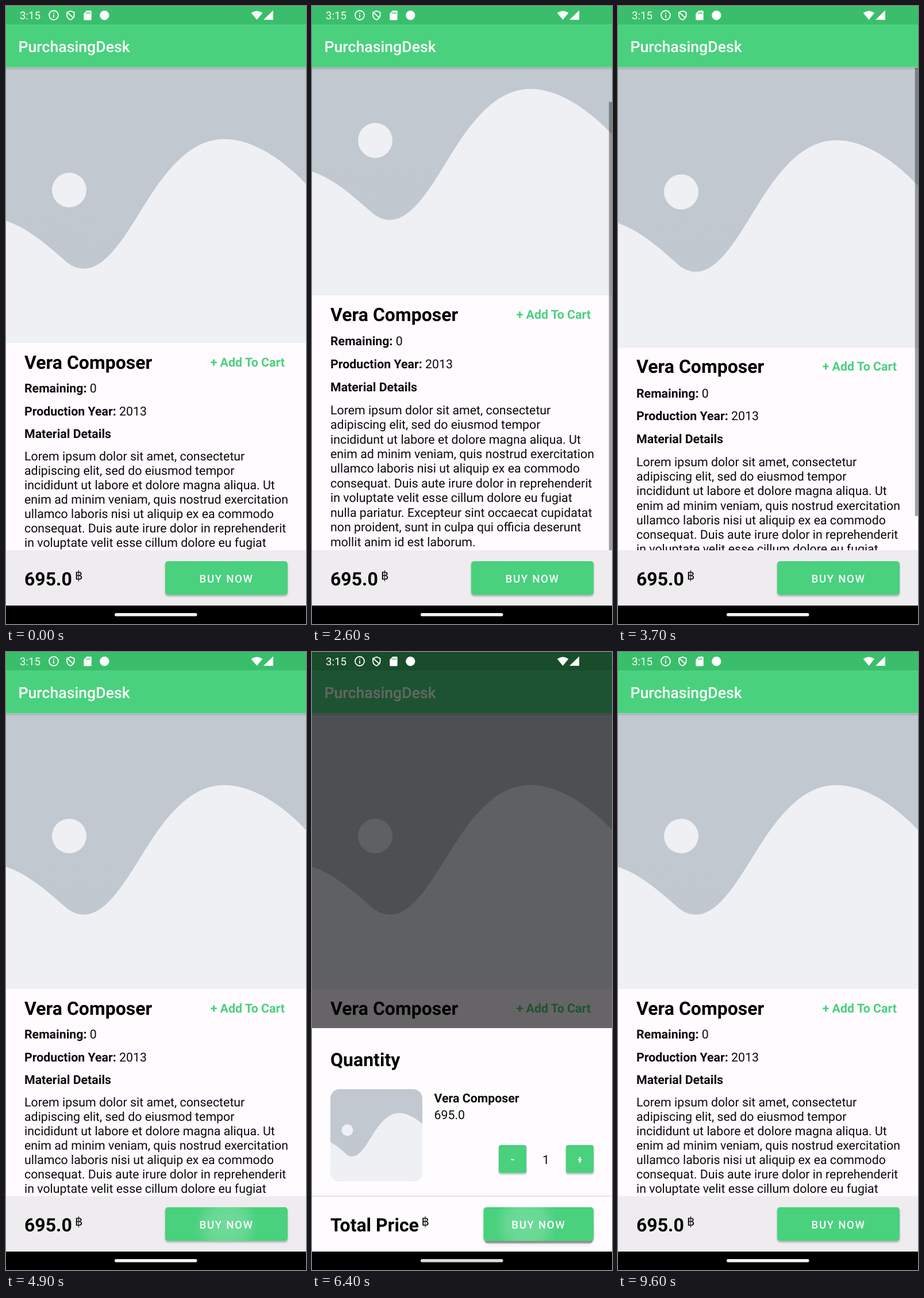
Recreate the animation shown at these times as an HTML page. Size 522 by 1073 pixels, loop 9.9 s.

```html
<!DOCTYPE html>
<html lang="en">
<head>
<meta charset="utf-8">
<title>Product page</title>
<style>
  html, body { margin: 0; width: 100%; height: 100%; overflow: hidden; background: #000; }
  svg { display: block; width: 100%; height: 100%; }
  text { font-family: Roboto, "Noto Sans", "DejaVu Sans", sans-serif; font-size: 21.33px; fill: #0a0a0b; white-space: pre; text-rendering: geometricPrecision; }
  .bold { font-weight: 700; }
  .big { font-size: 32px; font-weight: 700; fill: #000; }
  .baht { font-size: 21.33px; }
  .bar { font-size: 26.67px; font-weight: 500; fill: #fff; }
  .small { font-size: 18.67px; }
  .cta { font-size: 18.67px; font-weight: 500; letter-spacing: 1.67px; fill: #fff; }
  .green { fill: #4ad17e; }
  .white { fill: #fff; }
  .line { fill: none; stroke: #fff; stroke-width: 1.8; }
</style>
</head>
<body>
<svg viewBox="0 0 522 1073" preserveAspectRatio="none">
  <defs>
    <linearGradient id="sky" x1="0" y1="0" x2="0" y2="1">
      <stop offset="0" stop-color="#c2c8d0"/><stop offset="1" stop-color="#c0c8cf"/>
    </linearGradient>
    <linearGradient id="under" x1="0" y1="0" x2="0" y2="1">
      <stop offset="0" stop-opacity=".16"/><stop offset="1" stop-opacity="0"/>
    </linearGradient>
    <radialGradient id="wash">
      <stop offset="0" stop-color="#fff" stop-opacity=".22"/>
      <stop offset=".6" stop-color="#fff" stop-opacity=".16"/>
      <stop offset="1" stop-color="#fff" stop-opacity="0"/>
    </radialGradient>
    <filter id="lift" x="-20%" y="-20%" width="140%" height="160%">
      <feDropShadow dx="0" dy="2.2" stdDeviation="1.7" flood-opacity=".3"/>
    </filter>
    <filter id="float" x="-10%" y="-30%" width="120%" height="170%">
      <feDropShadow dx="0" dy="2.5" stdDeviation="3" flood-opacity=".3"/>
    </filter>
    <clipPath id="view"><rect y="106.5" width="522" height="838.5"/></clipPath>
    <clipPath id="thumb"><rect x="32" y="759" width="160" height="160" rx="16"/></clipPath>
    <clipPath id="mainClip"><rect x="277" y="964" width="213" height="58.5" rx="5"/></clipPath>
    <clipPath id="sheetClip"><rect x="298.5" y="964" width="191.5" height="58.5" rx="5"/></clipPath>
    <clipPath id="plusClip"><rect x="463" y="870" width="6.4" height="24"/></clipPath>
    <g id="picture">
      <rect y="107" width="522" height="478" fill="url(#sky)"/>
      <path fill="#eef0f4" d="M0 373C40 386 76 419 106 445C125 460 147 460 168 443C203 416 231 356 265 309C299 262 335 231 380 231C430 231 482 267 522 309V585H0Z"/>
      <circle cx="110" cy="319.5" r="30" fill="#eef0f4"/>
    </g>
  </defs>

  <rect width="522" height="1073" fill="#fffbff"/>
  <g id="content" clip-path="url(#view)">
    <use id="photo" href="#picture"/>
    <text class="big" x="32" y="629.5">Vera Composer</text>
    <text class="bold green" x="485" y="625.5" text-anchor="end">+ Add To Cart</text>
    <text x="32" y="671.3"><tspan class="bold">Remaining:</tspan> 0</text>
    <text x="32" y="710.5"><tspan class="bold">Production Year:</tspan> 2013</text>
    <text class="bold" x="32" y="749.7">Material Details</text>
    <g id="details"></g>
    <rect id="thumbBar" x="516.7" width="5.3"/>
  </g>
  <rect y="106.5" width="522" height="5" fill="url(#under)"/>
  <rect y="32" width="522" height="74.5" class="green"/>
  <rect width="522" height="32" fill="#3bbe6c"/>
  <text class="bar" x="21.5" y="80">PurchasingDesk</text>

  <rect y="945" width="522" height="96" fill="#eeecee"/>
  <text class="big" x="32" y="1006">695.0</text>
  <text class="baht" x="120" y="996">฿</text>
  <rect class="green" x="277" y="964" width="213" height="58.5" rx="5" filter="url(#lift)"/>
  <g clip-path="url(#mainClip)"><circle id="mainRipple" cx="384" cy="994" fill="url(#wash)"/></g>
  <text class="cta" x="336.5" y="1000.5">BUY NOW</text>

  <rect id="dim" width="522" height="1041"/>
  <rect y="1041" width="522" height="32"/>

  <g id="sheet">
    <rect y="653" width="522" height="388" fill="#fffcff"/>
    <text class="big" x="32" y="719">Quantity</text>
    <g clip-path="url(#thumb)">
      <use href="#picture" transform="translate(32 759) scale(.3347) translate(-22 -107)"/>
    </g>
    <text class="bold" x="212.5" y="782">Vera Composer</text>
    <text x="212.5" y="810.5">695.0</text>
    <g class="green" filter="url(#lift)">
      <rect x="325" y="856" width="48" height="48.5" rx="4"/>
      <rect x="442" y="856" width="48" height="48.5" rx="4"/>
    </g>
    <text class="bold small white" x="349" y="887" text-anchor="middle">-</text>
    <g clip-path="url(#plusClip)">
      <text class="bold small white" x="466.2" y="887.5" text-anchor="middle">+</text>
    </g>
    <text x="407" y="889" text-anchor="middle">1</text>
    <rect y="944" width="522" height="1.4" fill="#dfdce0"/>
    <text class="big" x="32" y="1006">Total Price</text>
    <text class="baht" x="190.5" y="996">฿</text>
    <rect id="pressed" x="301" y="985" width="187" height="42" rx="5" filter="url(#float)"/>
    <rect class="green" x="298.5" y="964" width="191.5" height="58.5" rx="5" filter="url(#lift)"/>
    <g clip-path="url(#sheetClip)"><circle id="sheetRipple" cx="372" cy="994" fill="url(#wash)"/></g>
    <text class="cta" x="347.2" y="1000.5">BUY NOW</text>
  </g>

  <g id="toast">
    <rect x="100.5" y="920" width="320" height="57" rx="28.5" fill="#f7f4fc" filter="url(#float)"/>
    <circle cx="138" cy="948" r="16" fill="#3cc47c"/>
    <text class="small" x="167" y="955" style="fill:#1d1c20">Successfully order the item.</text>
  </g>

  <rect id="handle" x="189" y="1054" width="143.5" height="5.6" rx="2.8" fill="#f3f3f5"/>
  <g class="white">
    <text class="small white" x="24" y="23">3:15</text>
    <circle class="line" cx="83" cy="16" r="8"/>
    <path d="M82.1 15h1.8v5.2h-1.8zM82.1 11.6h1.8v1.8h-1.8z"/>
    <path class="line" d="M112.3 8.6L118.6 11V15.5C118.6 19.5 116 22.6 112.3 24C108.6 22.6 106 19.5 106 15.5V11ZM106.5 11L117 20.5"/>
    <path d="M140.5 8H147.2Q148.7 8 148.7 9.5V23Q148.7 24.5 147.2 24.5H136.8Q135.3 24.5 135.3 23V13.2Z"/>
    <path d="M140.5 10.5v3.5M143.1 10.5v3.5M145.7 10.5v3.5" stroke="#3bbe6c" stroke-width="1.3"/>
    <circle cx="171.3" cy="16.2" r="8.2"/>
    <path d="M426.7 12Q436.5 4.8 446.3 12L436.5 24Z"/>
    <path d="M448 24L465 7.5V24Z"/>
  </g>
</svg>
<script>
const LOOP = 9900, STEP = 100;
const TOP = 107, BOTTOM = 945, VIEW = BOTTOM - TOP, RANGE = 76.5;
const PHOTO = 478;
const $ = id => document.getElementById(id);
const set = (id, attrs) => { for (const k in attrs) $(id).setAttribute(k, attrs[k]); };
const seg = (t, a, b) => Math.min(1, Math.max(0, (t - a) / (b - a)));
const ease = (t, a, b) => 0.5 - 0.5 * Math.cos(Math.PI * seg(t, a, b));

const lines = [
  'Lorem ipsum dolor sit amet, consectetur',
  'adipiscing elit, sed do eiusmod tempor',
  'incididunt ut labore et dolore magna aliqua. Ut',
  'enim ad minim veniam, quis nostrud exercitation',
  'ullamco laboris nisi ut aliquip ex ea commodo',
  'consequat. Duis aute irure dolor in reprehenderit',
  'in voluptate velit esse cillum dolore eu fugiat',
  'nulla pariatur. Excepteur sint occaecat cupidatat',
  'non proident, sunt in culpa qui officia deserunt',
  'mollit anim id est laborum.'
];
$('details').innerHTML = lines
  .map((s, i) => `<text x="32" y="${(789 + i * 25.04).toFixed(1)}">${s}</text>`).join('');
const rows = [...document.querySelectorAll('#content text')]
  .map(el => ({ el, y: +el.getAttribute('y') }));

// Overscroll pull, strongest next to the edge that was reached.
const pull = d => 15 * (d / VIEW) * (1 - 0.25 * d / VIEW);

function scrollPage(t) {
  const scroll = RANGE * (ease(t, 2000, 2500) - ease(t, 3000, 3500));
  const low = seg(t, 2400, 2600) - ease(t, 2700, 3000);
  const high = ease(t, 3400, 3700) - ease(t, 3800, 4300);
  const place = y => {
    const s = y - scroll;
    return s + high * pull(s - TOP) - low * pull(BOTTOM - s);
  };

  const photoTop = place(TOP);
  const scale = (place(TOP + PHOTO) - photoTop) / PHOTO;
  set('photo', { transform: `translate(0 ${photoTop}) scale(1 ${scale}) translate(0 ${-TOP})` });
  for (const { el, y } of rows) el.setAttribute('transform', `translate(0 ${place(y) - y})`);

  const ratio = VIEW / (VIEW + RANGE);
  const barStart = TOP + scroll * (1 + ratio);
  const barTop = place(barStart);
  set('thumbBar', {
    y: barTop,
    height: place(barStart + VIEW * ratio) - barTop,
    opacity: 0.37 * (seg(t, 2000, 2100) - seg(t, 4250, 4650))
  });
}

function ripple(id, t, start) {
  const age = t - start;
  set(id, {
    r: age < 0 ? 0 : 25 + 0.3 * age,
    opacity: age < 0 ? 0 : 1 - seg(age, 150, 450)
  });
}

function draw(t) {
  scrollPage(t);
  ripple('mainRipple', t, 4800);
  ripple('sheetRipple', t, 6300);

  const shown = ease(t, 5100, 5340) - ease(t, 6600, 6840);
  const dim = seg(t, 5100, 5430) - seg(t, 6600, 6930);
  set('sheet', { transform: `translate(0 ${208 * (1 - shown)})`, opacity: shown });
  set('dim', { opacity: 0.6 * dim });
  set('handle', { opacity: 1 - 0.1 * dim });
  set('pressed', { opacity: 0.3 * (seg(t, 6200, 6400) - seg(t, 6500, 6700)) });

  set('toast', { opacity: ease(t, 6850, 7200) - ease(t, 8850, 9100) });
}

const begin = performance.now();
function tick() {
  const t = (performance.now() - begin) % LOOP;
  draw(Math.floor(t / STEP) * STEP);
  requestAnimationFrame(tick);
}
tick();
</script>
</body>
</html>
```
